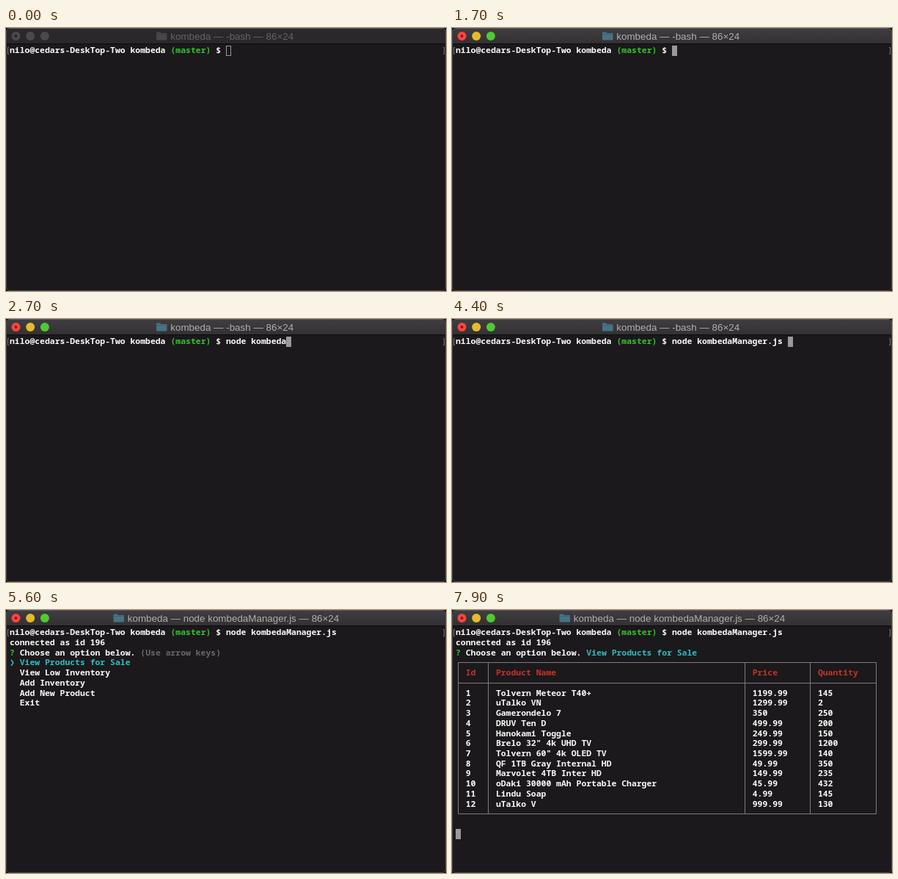
An HTML page for the animation above (8000 ms loop, 600 by 358 pixels).

```html
<!DOCTYPE html>
<html lang="en">
<head>
<meta charset="utf-8">
<title>Terminal</title>
<style>
  html, body { margin: 0; width: 100%; height: 100%; overflow: hidden; background: #1b191b; }
  svg { display: block; width: 600px; height: 358px; }
  text { white-space: pre; }
  .mono { font: 600 11.43px "Noto Sans Mono", "DejaVu Sans Mono", monospace; }
  .mono.bold { font-weight: 800; }
  .title { font: 13.4px "Liberation Sans", Arial, sans-serif; }
</style>
</head>
<body>
<svg id="stage" viewBox="0 0 600 358" xmlns="http://www.w3.org/2000/svg">
  <defs>
    <linearGradient id="bar" x2="0" y2="1">
      <stop offset="0" stop-color="#3f3d3f"/><stop offset="1" stop-color="#333133"/>
    </linearGradient>
    <clipPath id="window"><rect width="600" height="358" rx="5"/></clipPath>
  </defs>
  <rect width="600" height="358" fill="#121112"/>
  <g clip-path="url(#window)">
    <rect width="600" height="358" fill="#1b191b"/>
    <g id="chrome"></g>
    <path d="M0 21.5H600" stroke="#0c0b0c"/>
  </g>
  <rect x=".5" y=".5" width="599" height="357" rx="4.5" fill="none" stroke="#474547"/>
  <path d="M5 .5H595" stroke="#5c5a5c"/>
  <path d="M4 26.5H2.5V35.5H4M596 26.5H597.5V35.5H596" fill="none" stroke="#777577"/>
  <g id="screen"></g>
</svg>
<script>
const LOOP = 8000, CELL = 6.86, LINE = 13.72, LEFT = 5, MID = 30.5;
const WHITE = '#fbfbfb', GREEN = '#35c52b', CYAN = '#2fbcc4', RED = '#c5342a', GRAY = '#69676a';
const APP = 'kombeda', COMMAND = `node ${APP}Manager.js `, PROMPT_COLS = 43;

const rows = [
  ['Tolvern Meteor T40+', '1199.99', 145],
  ['uTalko VN', '1299.99', 2],
  ['Gamerondelo 7', '350', 250],
  ['DRUV Ten D', '499.99', 200],
  ['Hanokami Toggle', '249.99', 150],
  ['Brelo 32" 4k UHD TV', '299.99', 1200],
  ['Tolvern 60" 4k OLED TV', '1599.99', 140],
  ['QF 1TB Gray Internal HD', '49.99', 350],
  ['Marvolet 4TB Inter HD', '149.99', 235],
  ['oDaki 30000 mAh Portable Charger', '45.99', 432],
  ['Lindu Soap', '4.99', 145],
  ['uTalko V', '999.99', 130]
];
const menu = ['View Products for Sale', 'View Low Inventory', 'Add Inventory', 'Add New Product', 'Exit'];

// [time, characters typed]; single keys, then completions
const keys = [
  ...Array.from({ length: 7 }, (_, i) => [1800 + 100 * i, i + 1]),
  [2700, 12], [3900, 13], [4200, 14], [4300, 15], [4400, COMMAND.length]
];

const colX = col => LEFT + col * CELL;
const rowY = row => MID + row * LINE;

function put(row, col, str, fill = WHITE, bold = false) {
  return `<text class="mono${bold ? ' bold' : ''}" x="${colX(col)}" y="${rowY(row) + 3.8}" fill="${fill}">${str}</text>`;
}

function cursor(row, col, solid = true) {
  const x = Math.round(colX(col)), y = Math.round(rowY(row) - 6.8);
  return solid
    ? `<rect x="${x}" y="${y}" width="7" height="14" fill="#9b999b"/>`
    : `<rect x="${x + .5}" y="${y + .5}" width="6" height="13" fill="none" stroke="#999799"/>`;
}

function drawChrome(focused, running) {
  const lights = focused ? ['#fb4540', '#e3bb2c', '#50c932'] : Array(3).fill('#4b494b');
  const x = running ? 146.5 : 205;
  const name = running ? COMMAND.trim() : '-bash';
  return `<rect width="600" height="21" fill="${focused ? 'url(#bar)' : '#2a282a'}"/>`
    + lights.map((c, i) => `<circle cx="${13.5 + 19.7 * i}" cy="10.9" r="6" fill="${c}"/>`).join('')
    + `<circle cx="13.5" cy="10.9" r="1.9" fill="${focused ? '#8a1511' : '#242224'}"/>`
    + `<path d="M${x} 6.5q0-1 1-1h4l1.5 1.5h7q1 0 1 1v7.5q0 1-1 1h-12.5q-1 0-1-1z" fill="${focused ? '#467386' : '#494749'}"/>`
    + `<path d="M${x} 8.5h14.5" stroke="${focused ? '#38606f' : '#3d3b3d'}" stroke-width=".8"/>`
    + `<text class="title" x="${x + 19.3}" y="15.7" fill="${focused ? '#b1afb1' : '#666466'}">${APP} — ${name} — 86×24</text>`;
}

function drawPrompt(typed) {
  return put(0, 0, `nilo@cedars-DeskTop-Two ${APP}`)
    + put(0, 32, '(master)', GREEN) + put(0, 41, '$')
    + put(0, PROMPT_COLS, COMMAND.slice(0, typed));
}

function drawQuestion() {
  return put(1, 0, 'connected as id 196') + put(2, 0, '?', GREEN, true)
    + put(2, 2, 'Choose an option below.', WHITE, true);
}

function drawMenu() {
  return drawQuestion() + put(2, 26, '(Use arrow keys)', GRAY) + put(3, 0, '❯', CYAN)
    + menu.map((item, i) => put(3 + i, 2, item, i ? WHITE : CYAN)).join('');
}

function drawTable() {
  const starts = [2, 8, 59, 72];
  const line = (cells, row, fill) => cells.map((c, i) => put(row, starts[i], c, fill)).join('');
  const snap = v => Math.floor(v) + .5;
  const edge = col => snap(colX(col + .5));
  const [l, r, top, bottom] = [edge(0), edge(83.1), snap(rowY(3)), snap(rowY(18))];
  const across = [3, 5, 18].map(row => `M${l} ${snap(rowY(row))}H${r}`).join('');
  const down = [0, 6, 57, 70, 83.1].map(col => `M${edge(col)} ${top}V${bottom}`).join('');
  return drawQuestion() + put(2, 26, menu[0], CYAN)
    + `<path d="${across}${down}" fill="none" stroke="#7d7b7d"/>`
    + line(['Id', 'Product Name', 'Price', 'Quantity'], 4, RED)
    + rows.map((cells, i) => line([i + 1, ...cells], 6 + i)).join('')
    + cursor(20, 0);
}

function stateAt(t) {
  const typed = keys.reduce((n, [time, count]) => t >= time ? count : n, 0);
  const phase = t < 5100 ? 'typing' : t < 5600 ? 'waiting' : t < 7700 ? 'menu' : 'table';
  return { focused: t >= 1100, typed, phase };
}

const chrome = document.getElementById('chrome');
const screenGroup = document.getElementById('screen');
let shown = '';

function render(t) {
  const state = stateAt(t), key = JSON.stringify(state);
  if (key === shown) return;
  shown = key;
  const { focused, typed, phase } = state;
  const body = {
    typing: () => cursor(0, PROMPT_COLS + typed, focused),
    waiting: () => cursor(1, 0),
    menu: drawMenu,
    table: drawTable
  };
  chrome.innerHTML = drawChrome(focused, phase !== 'typing');
  screenGroup.innerHTML = drawPrompt(typed) + body[phase]();
}

const start = performance.now();
function tick() {
  render((performance.now() - start) % LOOP);
  requestAnimationFrame(tick);
}
tick();
</script>
</body>
</html>
```
